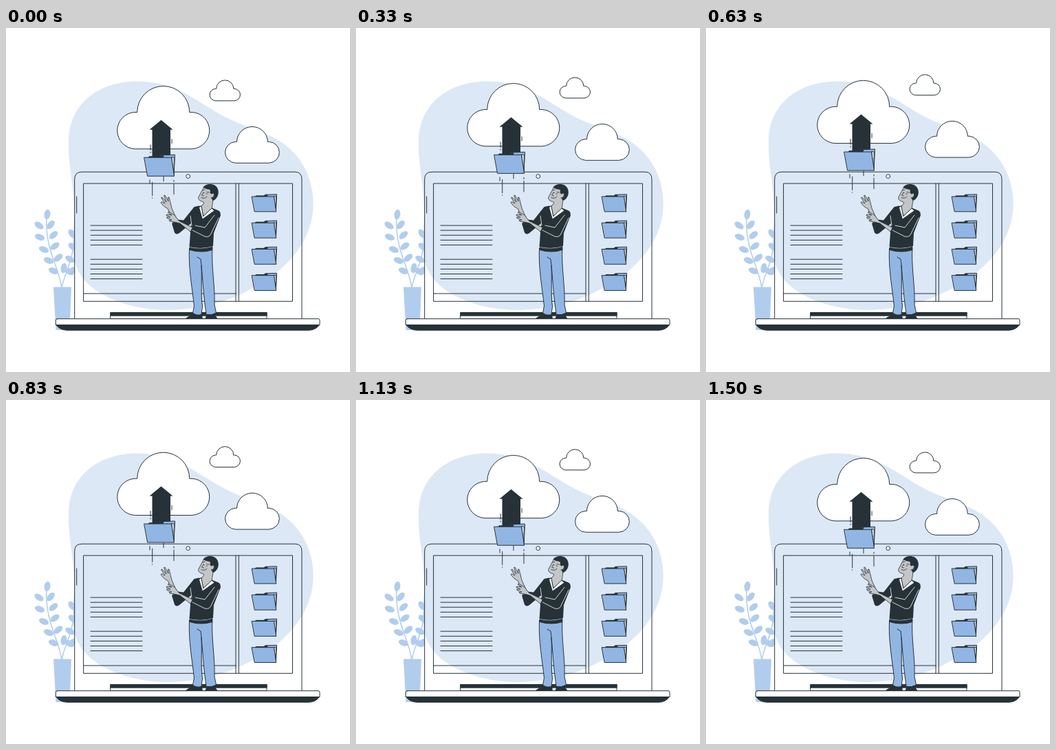
An HTML page for the animation above (1.54 s loop, 500 by 500 pixels).

```html
<!DOCTYPE html>
<html lang="en">
<head>
<meta charset="utf-8">
<title>Cloud upload</title>
<style>
  html, body { margin: 0; width: 100%; height: 100%; overflow: hidden; background: #fff; }
  svg { display: block; width: 100%; height: 100%; }
  .line { fill: none; stroke: #263238; stroke-linecap: round; stroke-linejoin: round; }
  .white { fill: #fff; }
  .dark { fill: #263238; }
  .blue { fill: #92b6e4; }
  .skin { fill: #c3c5c7; }
  .line.white { fill: #fff; }
  .line.blue { fill: #92b6e4; }
  .line.dark { fill: #263238; }
  .line.skin { fill: #c3c5c7; stroke-width: .8; }
  .crease { fill: none; stroke: #fff; stroke-width: .8; stroke-linecap: round; }
  #cloud, #folder * { vector-effect: non-scaling-stroke; }
</style>
</head>
<body>
<svg viewBox="0 0 500 500">
  <defs>
    <path id="cloud" class="line white" d="M26.8 91.3A26.7 26.7 0 0 1 26.8 38H30.7A38 38 0 0 1 106.7 38H110.7A26.7 26.7 0 0 1 110.7 91.3Z"/>
    <g id="folder">
      <path class="line blue" d="M21 4 23.5.6 44.5 0 43 31 30 28Z"/>
      <path class="line white" d="M40 3.5 43.2 4 43 30Z"/>
      <path class="line dark" d="M6 3.8 7 2.6H21.5L24 1.4H28L27 3.8Z"/>
      <path class="line blue" d="M0 4H39.5L43.5 31H5Z"/>
    </g>
    <clipPath id="leftOfLaptop"><path d="M0 0H99.5V500H0Z"/></clipPath>
  </defs>

  <path fill="#dce8f5" d="M91 164C92 112 132 78 190 77.5C250 77 282 112 326 133C356 147 394 154 419 182C440 205 448 235 446.500 262C443 316 402 358 345 385C312 401 276 409 238 410C188 411 135 393 112 364C92 338 97 307 99 279C101 238 90 202 91 164Z"/>

  <g id="plant" fill="#b1cdee" clip-path="url(#leftOfLaptop)">
    <path d="M69 376.500H95L92.500 439H72.500Z"/>
    <path fill="none" stroke="#b1cdee" stroke-width="1.500" d="M81 378C77 345 56 325 59 270M81 378C84 358 98 340 100 300"/>
  </g>

  <g class="line">
    <path d="M99.700 422.500V220Q99.700 209.200 110 209.200H420Q430 209.200 430 220V422.500M102.700 245V269"/>
    <path d="M113 226H416.500V397.300H113ZM334 226V397M338.300 226V397M113 386H334"/>
    <path id="textLines"/>
  </g>
  <circle class="line white" cx="264.700" cy="215.600" r="2.900"/>
  <path class="line white" d="M152 413.500H379V422.500H152Z"/>
  <path class="dark" d="M152 413H379.500V418.700H152Z"/>
  <path class="line dark" d="M72.500 431H456Q450 439.300 440 439.300H89Q78 439.300 72.500 431Z"/>
  <path class="line white" d="M74.500 422.700H454Q456 422.700 456 425V431.500H72.300V425Q72.300 422.700 74.500 422.700Z"/>

  <g id="sidebar"></g>

  <g id="man">
    <path class="dark" d="M260 423C264 419 269 418 273 416H285L286 423ZM289 423 292 416H303L308 423Z"/>
    <path class="line blue" d="M266.500 320C265 350 271 380 273.500 404L271.500 414Q276 418.500 284 416.500L285.500 405C283 388 285 370 284 345C286 366 287 386 289.500 404L291 416.500Q299 418 305.500 414L303 402C304 374 298 345 300 319Z"/>
    <path class="line" d="M284 345 283 336 278 333"/>
    <path class="dark" d="M267 317 300 316V323Q284 328 267 323Z"/>
    <path class="crease" d="M268 318.500Q284 322 299 317.500"/>
    <path class="line skin" d="M243.500 284 235.500 263 230 259.500 225 254 226 252.500 231 255 225.500 246.500 227 246 233 253 229.500 243.500 231 243 236 252 235.500 246 237 246 239.500 256 241 262 249.500 281Z"/>
    <path class="dark" d="M280 258.500 273.500 260 258 279.500 250 278.500 241 284 245 297.500Q248 301 252 298L269 284 266.500 318Q284 322 301 317L302 298 311.500 273Q313 267 308 265L298 261Z"/>
    <path class="line skin" d="M271 290 251.500 280.500 245 272 240 269 236 267 235.500 268.500 241 272 233.500 271 233 272.500 239 275 233.500 275 234 276.500 241 279 237 279.500 238 281 247 282.500 253 284 268 296Z"/>
    <path class="dark" d="M273 287.500 267.500 296.500 289 305.500Q296 307 299 302L312 272 303 267 290 291Z"/>
    <path class="crease" d="M309 276 297.500 300Q295 304.500 289 303L271 294M303 272 289 290 275 287M268 273 270 287"/>
    <path class="line skin" d="M287.500 231.500 284 238 279.500 246.500Q279.500 251 286 252.500L288 254 283.500 260 287 273.500 299 263 301 250 302 240 295 234Z"/>
    <path class="line white" d="M283.500 258.500 280.500 261 285.500 278 303 265.500 299 262 287 273.500Z"/>
    <path class="dark" d="M286.500 232C289 227 298 225.500 304 229C310 233 310 242 306 247Q304 250 300.500 251L298.500 247 300 242 296.500 240 297 235Q292 235 286.500 232Z"/>
    <path class="line skin" d="M298.500 241Q303 239 302.500 243T298 247"/>
    <path class="line" stroke-width=".8" d="M286 236 289 235M292 238.500 295 239M287 239 284.500 243 287.500 244M284 246.500Q289 249 292 245M287 239.500H288M291 241H292.500"/>
  </g>

  <g id="floating">
    <use href="#cloud" x="160" y="84.200"/>
    <use href="#cloud" transform="translate(317.500 143.200) scale(.588 .578)"/>
    <use href="#cloud" transform="translate(295.500 75.600) scale(.331 .328)"/>
    <path class="dark" d="M225.500 133.500 242.500 147.500H239V188H212.500V147.500H208.500Z"/>
    <path class="line" d="M210 169.500V177M210 180V181M241 161.500V167.500M209 220.500V226M212.700 224V243.500M212.700 246.500V247M229 216V222.500M244 221V223M244 226V241.500"/>
    <use href="#folder" x="201" y="184"/>
  </g>
</svg>
<script>
  const find = id => document.getElementById(id);
  const add = (parent, tag, attributes) => {
    const node = document.createElementNS("http://www.w3.org/2000/svg", tag);
    for (const name in attributes) node.setAttribute(name, attributes[name]);
    find(parent).append(node);
  };

  const rows = [0, 1, 2, 3, 4].map(i => i * 7.1);
  find("textLines").setAttribute("d", [287, 336.2].flatMap(top =>
    rows.map(y => `M123 ${top + y}H198`)).join(""));

  for (let i = 0; i < 4; i++)
    add("sidebar", "use", { href: "#folder", transform: `translate(357.5 ${241.8 + i * 38.2}) scale(.81)` });

  // Each leaf: centre x, centre y, tilt.
  const leaves = [
    [60, 271, 8], [48, 287, -55], [65, 286, 40], [49, 304, -68], [69, 301, 50],
    [55, 322, -68], [71, 317, 55], [62, 338, -68], [76, 334, 50], [69, 353, -68],
    [84, 349, 10], [96, 299, -35], [97, 318, -50], [93, 336, -60], [92, 354, -60], [97, 352, 60]
  ];
  for (const [x, y, tilt] of leaves)
    add("plant", "ellipse", { rx: 4.4, ry: 7.4, transform: `translate(${x} ${y}) rotate(${tilt})` });

  const LOOP = 1540;
  function draw(now) {
    const phase = 2 * Math.PI * (now % LOOP + 35) / LOOP;
    const lift = 4.3 * (1 - Math.cos(phase)) - .3;
    find("floating").setAttribute("transform", `translate(0 ${-lift})`);
    requestAnimationFrame(draw);
  }
  requestAnimationFrame(draw);
</script>
</body>
</html>
```
